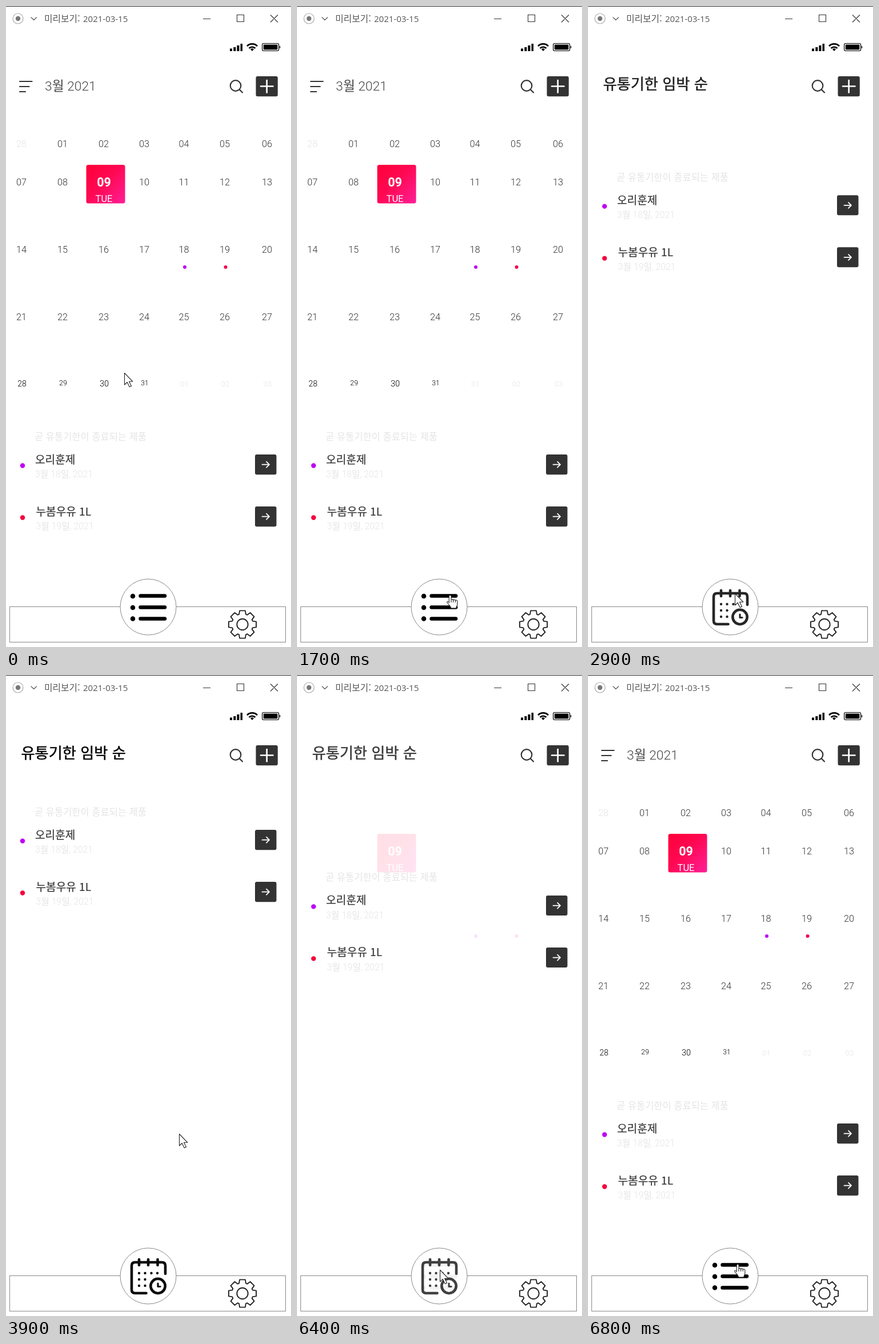
Animation of 499x1122 px, one loop 6.9 s. Source, as an HTML page:

```html
<!DOCTYPE html>
<html lang="ko">
<head>
<meta charset="utf-8">
<title>Calendar preview</title>
<style>
  html, body { margin: 0; width: 100%; height: 100%; overflow: hidden; background: #fff; }
  svg { display: block; width: 499px; height: 1122px; }
  text { font-family: Roboto, "Noto Sans CJK KR", "Noto Sans CJK", sans-serif; }
  .ko { font-family: "Noto Sans CJK KR", "Noto Sans CJK", sans-serif; }
  .mid { text-anchor: middle; }
  .thin { font-weight: 300; }
  .pale { font-weight: 300; fill: #e4e4e4; }
  .semi { fill: #333; stroke: #333; stroke-width: .2; }
  .line { fill: none; stroke-linecap: round; stroke-linejoin: round; }
</style>
</head>
<body>
<svg viewBox="0 0 499 1122" xmlns="http://www.w3.org/2000/svg">
  <defs>
    <linearGradient id="tile" x1="0" y1="0" x2="1" y2="1">
      <stop offset="0" stop-color="#ff0038"/>
      <stop offset=".45" stop-color="#ff0852"/>
      <stop offset="1" stop-color="#ff1f96"/>
    </linearGradient>
  </defs>
  <rect width="499" height="1122" fill="#fff"/>

  <!-- window bar -->
  <rect width="499" height="1" fill="#2b2b2b"/>
  <circle cx="21" cy="22" r="9" fill="none" stroke="#aaa" stroke-width="1.2"/>
  <circle cx="21" cy="22" r="4.2" fill="#777"/>
  <path class="line" d="M44 20l4.7 4.5 4.7-4.5" stroke="#666" stroke-width="1.5"/>
  <text class="ko" x="67" y="28" font-size="15.8" fill="#555">미리보기:</text>
  <text x="135" y="28" font-size="15" fill="#555" style="font-family:'Open Sans',sans-serif">2021-03-15</text>
  <path d="M345 22.5h13M404.5 15.5h12v12h-12zM463 15.5l13 13M476 15.5l-13 13" fill="none" stroke="#333" stroke-width="1.1"/>

  <!-- status icons -->
  <path d="M392 74.5h4v4.5h-4zM398.300 72h4v7h-4zM404.400 69h4v10h-4zM410.500 66h3.500v13h-3.500z"/>
  <path d="M422 70.200a12.700 12.700 0 0 1 18 0M425.500 74a7.800 7.800 0 0 1 11 0" fill="none" stroke="#000" stroke-width="2.700"/>
  <path d="M431 79l-3-3.200a4.300 4.300 0 0 1 6 0z"/>
  <rect x="448.600" y="65.500" width="29" height="13" rx="2.500" fill="none" stroke="#000" stroke-width="1.200"/>
  <rect x="450.800" y="67.500" width="24.600" height="9" rx="1"/>
  <path d="M478.800 69.500v5q1.600-.6 1.600-2.500t-1.600-2.500z"/>

  <!-- shared header buttons -->
  <g class="line" stroke="#333" stroke-width="2.200">
    <circle cx="402" cy="139.500" r="9.300"/>
    <path d="M409 146.500l5 5"/>
  </g>
  <rect x="437.500" y="123" width="38.300" height="35.300" rx="3" fill="#333"/>
  <path class="line" d="M446 140.500h21.500M456.700 130v21.500" stroke="#fff" stroke-width="2.700"/>

  <!-- calendar screen -->
  <g id="days">
    <path class="line" d="M24 132h21.500M24 141h16.500M24 150h10" stroke="#333" stroke-width="2.200"/>
    <text class="thin" x="68" y="148" font-size="22.800" fill="#444">3월 2021</text>
  </g>
  <g id="today">
    <rect x="140.500" y="278" width="68" height="67.500" rx="3.500" fill="url(#tile)"/>
    <text class="mid" x="171.500" y="316" font-size="21.500" font-weight="700" fill="#fff">09</text>
    <text class="mid" x="171.500" y="343" font-size="16.500" fill="#fff">TUE</text>
    <circle cx="313" cy="457" r="3" fill="#bf00f5"/>
    <circle cx="384.500" cy="457" r="3" fill="#f5004a"/>
  </g>

  <text id="title" class="ko" x="26.500" y="146" font-size="26.200" stroke="#000" stroke-width=".5">유통기한 임박 순</text>

  <g id="list">
    <text class="ko pale" x="50" y="759.500" font-size="16.500">곧 유통기한이 종료되는 제품</text>
  </g>

  <!-- bottom bar -->
  <g fill="#fff" stroke="#888">
    <rect x="6.500" y="1051.500" width="483" height="62"/>
    <circle cx="249" cy="1052" r="49"/>
  </g>
  <g class="line" stroke="#222" stroke-width="1.900">
    <path id="gear"/>
    <circle cx="414" cy="1082.500" r="9.700"/>
  </g>
  <g id="listIcon">
    <path class="line" d="M222 1033h.01M222 1053h.01M222 1072.500h.01" stroke="#000" stroke-width="8.500"/>
    <path class="line" d="M235.500 1032.500h42.500M235.500 1052.500h42.500M235.500 1072.500h42.500" stroke="#000" stroke-width="6.500"/>
  </g>
  <g id="calIcon" class="line" stroke="#0a0a0a" stroke-width="4.600">
    <path d="M279 1048v-14q0-6-6-6h-47q-6 0-6 6v42q0 6 6 6h19.500M233 1023v10M249 1023v10M265.500 1023v10"/>
    <circle cx="266" cy="1069.500" r="12.700"/>
    <path d="M266 1065v5.500h4" stroke-width="3.200"/>
    <path d="M233 1047h.01M243.500 1047h.01M254.500 1047h.01M265 1047h.01M233 1058h.01M243.500 1058h.01M233 1069h.01M243.500 1069h.01" stroke-width="4.400"/>
  </g>

  <g id="cursor" fill="#fff" stroke="#222" stroke-width="1.100" stroke-linejoin="round">
    <path id="arrow" d="M.5 .5V21l4.700-4.500 4 8.300 3.300-1.500-4-8.100h6.200z"/>
    <path id="hand" transform="translate(-6.500 0)" d="M4.700 14V2.300a1.900 1.900 0 0 1 3.800 0V9c0-2 3.600-1.800 3.600.2.2-1.600 3.600-1.400 3.600.6.4-1.400 3.600-1 3.600 1V16c0 3-2 4-2 7H8c0-3-3-5-6.500-9.500-1.200-2 1-3 3.200-.5M8.500 9v4M12.100 9.500v3.500M15.700 10v3"/>
  </g>
</svg>
<script>
const LOOP = 6900, STEP = 100, SLIDE = 514, FADE = 300;
const TO_LIST = 2685, TO_CALENDAR = 6357.5;
const $ = id => document.getElementById(id);

function add(parent, name, attrs, content = '') {
  const el = document.createElementNS('http://www.w3.org/2000/svg', name);
  for (const key in attrs) el.setAttribute(key, attrs[key]);
  el.textContent = content;
  parent.append(el);
  return el;
}

function buildDays() {
  const columns = [27, 99, 171, 242, 311.5, 383, 457];
  const rows = [241, 308, 426.5, 544.5, 661];
  const lastSizes = [14, 12.5, 14.5, 12, 13, 13, 13];
  for (let i = 0; i < 35; i++) {
    if (i === 9) continue;
    const row = Math.floor(i / 7), col = i % 7, last = row === 4;
    const day = i === 0 ? 28 : i > 31 ? i - 31 : i;
    const size = last ? lastSizes[col] : 16.3;
    const outside = i === 0 || i > 31;
    const lift = i === 29 || i === 31 ? 1.5 : 0;
    add($('days'), 'text', {
      class: outside ? 'mid pale' : 'mid thin',
      x: columns[col] + (last ? 1 : 0),
      y: rows[row] + size * .355 - lift,
      'font-size': size,
      fill: last ? '#000' : '#333'
    }, String(day).padStart(2, '0'));
  }
}

function buildItem(name, date, color, dx, dy) {
  const list = $('list');
  add(list, 'circle', { cx: 29, cy: 804.5 + dy, r: 4.2, fill: color });
  add(list, 'text', { class: 'ko semi', x: 51 + dx, y: 800.5 + dy, 'font-size': 19.1 }, name);
  add(list, 'text', { class: 'pale', x: 51 + dx, y: 824.7 + dy, 'font-size': 15.8 }, date);
  add(list, 'rect', { x: 436, y: 785 + dy, width: 37.5, height: 35.2, rx: 3, fill: '#333' });
  add(list, 'path', {
    class: 'line', stroke: '#fff', 'stroke-width': 1.8,
    d: `M448.500 ${802.7 + dy}h12.500m-5 -5l5 5l-5 5`
  });
}

function buildGear() {
  const points = [];
  for (let i = 0; i < 8; i++) {
    for (const [offset, r] of [[-.32, 18.7], [-.2, 24.6], [.2, 24.6], [.32, 18.7]]) {
      const a = i * Math.PI / 4 + offset;
      points.push(`${(414 + r * Math.cos(a)).toFixed(1)} ${(1082.5 + r * Math.sin(a)).toFixed(1)}`);
    }
  }
  $('gear').setAttribute('d', `M${points.join('L')}Z`);
}

// Ease-out, equal to cubic-bezier(0, 0, .58, 1)
function easeOut(x) {
  if (x <= 0) return 0;
  if (x >= 1) return 1;
  let low = 0, high = 1;
  for (let i = 0; i < 20; i++) {
    const s = (low + high) / 2;
    if (1.74 * s * s * (1 - s) + s ** 3 < x) low = s; else high = s;
  }
  return low * low * (3 - 2 * low);
}

// Pointer path: time, x, y
const path = [
  [0, 207, 642], [200, 228, 612], [400, 270, 584], [600, 306, 598], [700, 312, 627],
  [900, 320, 717], [1000, 320, 717], [1300, 332, 810], [1500, 312, 930], [1700, 268, 1031],
  [2600, 268, 1031], [2800, 257, 1028], [3100, 257, 1028], [3400, 291, 890], [3600, 303, 803],
  [5100, 303, 803], [5200, 271, 918], [5300, 252, 985], [5400, 243, 1021], [5600, 243, 1021],
  [5900, 259, 1042], [6000, 256, 1042], [6300, 256, 1042], [6400, 250, 1041],
  [6500, 250, 1041], [6700, 262, 1031], [6900, 262, 1031]
];

function pointerAt(t) {
  const i = path.findIndex(key => key[0] > t);
  const [t0, x0, y0] = path[i - 1], [t1, x1, y1] = path[i];
  const k = (t - t0) / (t1 - t0);
  return [x0 + (x1 - x0) * k, y0 + (y1 - y0) * k];
}

function render(time) {
  const t = Math.floor((time % LOOP) / STEP) * STEP;
  const shown = easeOut((t - TO_LIST) / FADE) - easeOut((t - TO_CALENDAR) / FADE);
  const calendar = 1 - shown;

  $('list').setAttribute('transform', `translate(0 ${-SLIDE * shown})`);
  $('title').setAttribute('opacity', shown);
  $('calIcon').setAttribute('opacity', shown);
  $('days').setAttribute('opacity', calendar ** 4);
  $('listIcon').setAttribute('opacity', calendar ** 2);
  $('today').setAttribute('opacity', Math.max(0, (calendar - .12) / .88));

  const [x, y] = pointerAt(t);
  const still = shown === 0 || shown === 1;
  const hover = still && Math.hypot(x - 249, y - 1052) < 49;
  $('cursor').setAttribute('transform', `translate(${x} ${y})`);
  $('hand').setAttribute('visibility', hover ? 'visible' : 'hidden');
  $('arrow').setAttribute('visibility', hover ? 'hidden' : 'visible');
}

buildDays();
buildItem('오리훈제', '3월 18일, 2021', '#bf00f5', 0, 0);
buildItem('누봄우유 1L', '3월 19일, 2021', '#f5003c', 1.5, 91);
buildGear();

const start = performance.now();
function tick() {
  render(performance.now() - start);
  requestAnimationFrame(tick);
}
tick();
</script>
</body>
</html>
```
